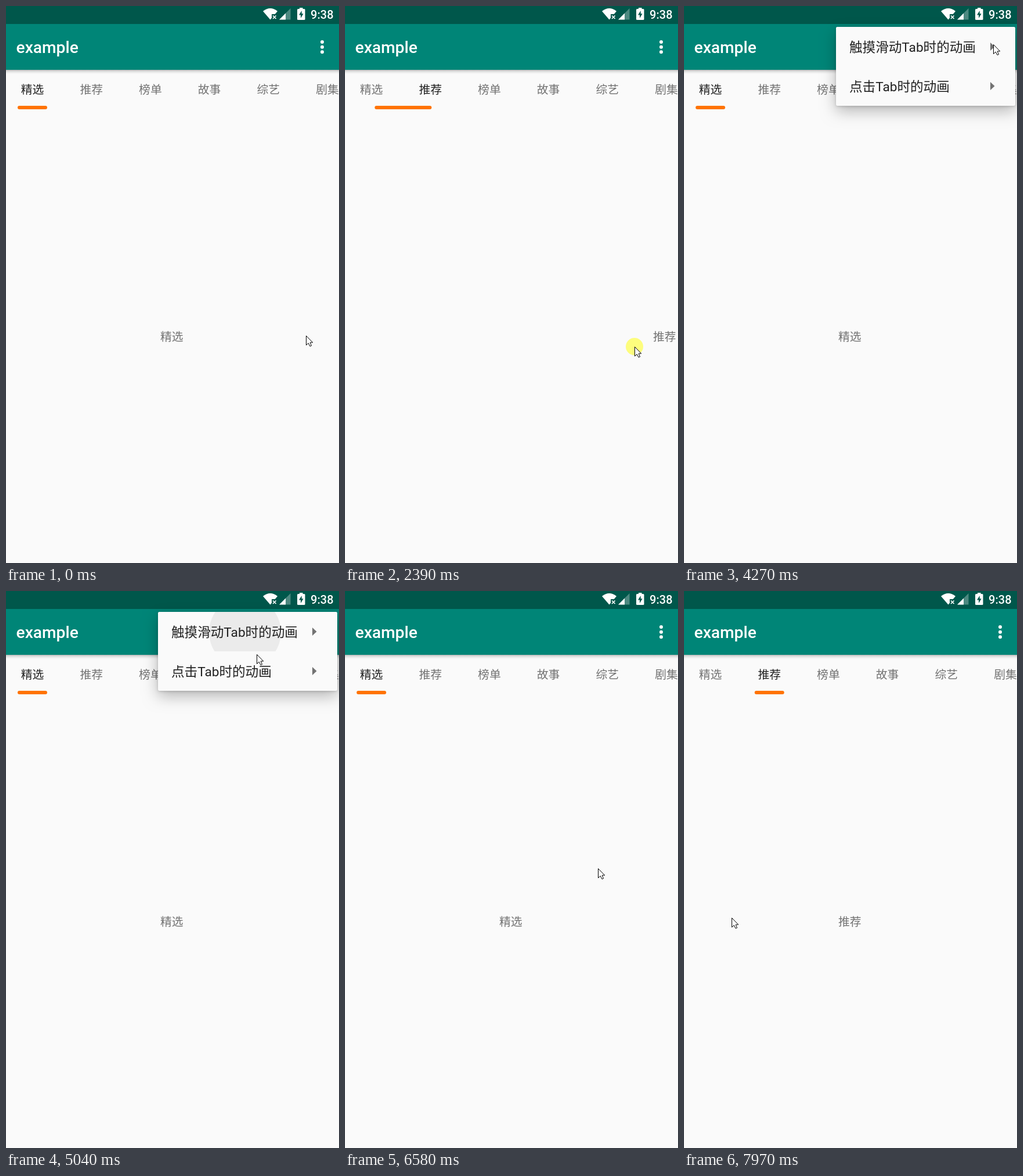
These frames come from a looping animation (574x960 px, 8000 ms). An HTML page with a canvas:

```html
<!DOCTYPE html>
<html lang="zh-CN">
<head>
<meta charset="utf-8">
<title>example</title>
<style>
html, body { margin: 0; width: 100%; height: 100%; overflow: hidden; background: #fafafa; }
canvas { display: block; }
</style>
</head>
<body>
<canvas id="stage" width="574" height="960"></canvas>
<script>
const W = 574, H = 960, LOOP = 8000, TICK = 77.5, LEAD = 23;
const ctx = document.getElementById('stage').getContext('2d');
const FONT = 'Roboto, "Noto Sans CJK SC", "Noto Sans CJK", sans-serif';
const BG = '#fafafa', DARK = '#212121', GREY = '#737373', STATUS = '#00574b';
const TABS = ['精选', '推荐', '榜单', '故事', '综艺', '剧集'];
const TAB_X = 45.5, PITCH = 101.7, BAR_W = 51, SLOP = 12;

// Long moves ease in and out, short ones are linear.
const CURSOR = [
  [1, 517, 568], [3, 520, 568], [5, 520, 568], [14, 165, 593], [18, 165, 595],
  [25, 222, 588], [27, 222, 588], [31, 499, 587], [32, 543, 589], [34, 555, 591],
  [38, 551, 592], [46, 541, 96], [48, 540, 66], [54, 540, 66], [61, 410, 72],
  [64, 410, 72], [65, 432, 109], [76, 432, 210], [80, 432, 210], [83, 435, 455],
  [89, 440, 545], [92, 415, 545], [94, 339, 545], [98, 104, 560], [99, 82, 563]
];

const swipe = (down, from, glue) => ({ down, up: down + 9, from, to: 1 - from, glue });
const SWIPES = [swipe(5, 0, 1), swipe(27, 1, 1), swipe(90, 0, 0.5)];

const clamp = (v, a = 0, b = 1) => Math.min(b, Math.max(a, v));
const span = (k, a, b) => clamp((k - a) / (b - a));
const easeOut = u => 1 - (1 - u) ** 2;
const smooth = u => u * u * (3 - 2 * u);
const within = (k, a, b) => k >= a && k <= b;

function cursorAt(k) {
  const i = CURSOR.findIndex(c => c[0] > k);
  const [t0, x0, y0] = CURSOR[i < 0 ? CURSOR.length - 1 : Math.max(0, i - 1)];
  if (i <= 0) return [x0, y0];
  const [t1, x1, y1] = CURSOR[i];
  const u = (k - t0) / (t1 - t0), e = t1 - t0 > 4 ? smooth(u) : u;
  return [x0 + (x1 - x0) * e, y0 + (y1 - y0) * e];
}

function pagerAt(k) {
  let state = { pos: 0, page: 0, glue: 1 };
  for (const s of SWIPES) {
    if (k < s.down) break;
    const dx = cursorAt(s.down)[0] - cursorAt(Math.min(k, s.up))[0];
    const moved = Math.sign(dx) * Math.max(0, Math.abs(dx) - SLOP) / W;
    const drag = clamp(s.from + moved);
    const f = smooth(span(k, s.up, s.up + 3.7));
    state = { pos: drag + (s.to - drag) * f, page: k > s.up ? s.to : s.from, glue: s.glue };
  }
  return state;
}

function text(str, x, y, size, color, weight = 400, align = 'left') {
  ctx.font = `${weight} ${size}px ${FONT}`;
  ctx.fillStyle = color;
  ctx.textAlign = align;
  ctx.fillText(str, x, y);
  return x + ctx.measureText(str).width;
}

function rect(x, y, w, h, color) {
  ctx.fillStyle = color;
  ctx.fillRect(x, y, w, h);
}

function poly(points, color) {
  ctx.beginPath();
  points.forEach(([x, y]) => ctx.lineTo(x, y));
  ctx.closePath();
  ctx.fillStyle = color;
  ctx.fill();
}

// Right triangle: corner at (x, y), legs along w and h.
function wedge(x, y, w, h, color) {
  ctx.beginPath();
  ctx.moveTo(x, y);
  ctx.lineTo(x + w, y);
  ctx.lineTo(x, y + h);
  ctx.fillStyle = color;
  ctx.fill();
}

function disc(x, y, r, color) {
  ctx.beginPath();
  ctx.arc(x, y, r, 0, 7);
  ctx.fillStyle = color;
  ctx.fill();
}

function round(x, y, w, h, r, color) {
  ctx.beginPath();
  ctx.roundRect(x, y, w, h, r);
  ctx.fillStyle = color;
  ctx.fill();
}

function statusBar() {
  rect(0, 0, W, 31, STATUS);
  ctx.beginPath();
  ctx.moveTo(455.5, 23.5);
  ctx.lineTo(443, 9);
  ctx.quadraticCurveTo(455.5, -1, 468, 9);
  ctx.fillStyle = '#fff';
  ctx.fill();
  rect(458, 14, 10, 10, STATUS);
  ctx.strokeStyle = '#fff';
  ctx.lineWidth = 1.7;
  ctx.beginPath();
  ctx.moveTo(460, 16.5);
  ctx.lineTo(465.5, 22);
  ctx.moveTo(465.5, 16.5);
  ctx.lineTo(460, 22);
  ctx.stroke();
  wedge(490.5, 23.5, -19.5, -19.5, 'rgba(255,255,255,.3)');
  wedge(482, 23.5, -11, -11, '#fff');
  rect(506, 3, 5.5, 3, '#fff');
  round(502, 5, 13.5, 19, 1.5, '#fff');
  wedge(509.7, 15.6, -4.7, -7.6, STATUS);
  wedge(508, 13.3, 4.6, 7.7, STATUS);
  text('9:38', 564.5, 22, 20, '#fff', 500, 'right');
}

function toolbar() {
  const g = ctx.createLinearGradient(0, 110, 0, 117);
  g.addColorStop(0, 'rgba(0,0,0,.26)');
  g.addColorStop(0.4, 'rgba(0,0,0,.1)');
  g.addColorStop(1, 'rgba(0,0,0,0)');
  rect(0, 110, W, 7, g);
  rect(0, 31, W, 79, '#008577');
  text('example', 17.5, 81, 28.2, '#fff', 500);
  for (let i = -1; i < 2; i++) disc(545, 70.7 + 8.6 * i, 3, '#fff');
}

function pager({ pos, page, glue }) {
  TABS.forEach((name, i) =>
    text(name, TAB_X + PITCH * i, 151.3, 19.8, i === page ? DARK : GREY, 400, 'center'));
  const w = BAR_W * (1 + glue * 2 * Math.min(pos, 1 - pos));
  round(TAB_X + PITCH * pos - w / 2, 172, w, 6, 3, '#ff7300');
  for (let i = 0; i < 2; i++)
    text(TABS[i], 285.7 + (i - pos) * W, 577.3, 19.8, GREY, 400, 'center');
}

// Popup that unfolds from its top right corner.
function popup(x, w, h, open, alpha, content) {
  if (open <= 0 || alpha <= 0) return;
  const y = 36, vw = w * open, vh = h * open, vx = x + w - vw;
  ctx.save();
  ctx.globalAlpha = alpha * clamp(open * 1.6);
  ctx.shadowColor = 'rgba(0,0,0,.28)';
  ctx.shadowBlur = 26;
  ctx.shadowOffsetY = 9;
  round(vx, y, vw, vh, 3, BG);
  ctx.shadowColor = 'rgba(0,0,0,.18)';
  ctx.shadowBlur = 4;
  ctx.shadowOffsetY = 1;
  round(vx, y, vw, vh, 3, BG);
  ctx.shadowColor = 'transparent';
  ctx.clip();
  content();
  ctx.restore();
}

function ripple(x, y, r, strength, left, top, w) {
  if (strength <= 0) return;
  ctx.save();
  ctx.beginPath();
  ctx.rect(left, top, w, 68);
  ctx.clip();
  disc(x, y, r, `rgba(0,0,0,${0.06 * strength})`);
  ctx.restore();
}

function mainMenu(k) {
  if (!within(k, 51, 68)) return;
  const fade = 1 - span(k, 65, 68);
  popup(262, 309, 136, easeOut(span(k, 50, 54)), fade, () => {
    if (k >= 64) ripple(412, 71, 20 + 42 * (k - 64), fade, 262, 36, 309);
    ['触摸滑动Tab时的动画', '点击Tab时的动画'].forEach((label, i) => {
      const y = 70 + 68 * i;
      text(label, 285, y + 8.5, 22.6, DARK);
      poly([[528, y - 7], [535.5, y], [528, y + 7]], GREY);
    });
  });
}

function subMenu(k) {
  if (!within(k, 67, 83)) return;
  popup(299, 309, 271, easeOut(span(k, 66, 70)), 1 - span(k, 81, 84), () => {
    if (k >= 80) ripple(432, 208, 20 + 50 * (k - 80), 1, 299, 172, 309);
    let x = text('触摸滑动', 321.5, 77.3, 19.8, GREY);
    x = text('Tab', x, 77.3, 19.8, GREY, 500);
    text('时的动画', x, 77.3, 19.8, GREY);
    ['GLUE', 'HALF_GLUE', 'NONE'].forEach((label, i) => {
      const y = 138 + 67.8 * i, color = i ? GREY : '#d81b60';
      text(label, 321.5, y + 8.5, 22.6, DARK);
      ctx.beginPath();
      ctx.arc(531, y, 12.8, 0, 7);
      ctx.strokeStyle = color;
      ctx.lineWidth = 2.8;
      ctx.stroke();
      if (!i) disc(531, y, 7.2, color);
    });
  });
}

function pointer(k) {
  const [x, y] = cursorAt(k).map(Math.round);
  const tapped = within(k, 49, 50) || k === 63 || within(k, 77, 79);
  if (tapped || SWIPES.some(s => within(k, s.down, s.up))) disc(x, y, 15, 'rgba(255,255,0,.5)');
  ctx.save();
  ctx.translate(x + 0.5, y + 0.5);
  poly([[0, 0], [0, 16], [3.7, 12.6], [6.5, 18], [9, 17], [6.6, 11.5], [11.2, 11.5]], '#fff');
  ctx.strokeStyle = '#000';
  ctx.lineWidth = 1;
  ctx.stroke();
  ctx.restore();
}

function draw(k) {
  rect(0, 0, W, H, BG);
  pager(pagerAt(k));
  toolbar();
  statusBar();
  mainMenu(k);
  subMenu(k);
  pointer(k);
}

function loop() {
  draw(Math.floor((performance.now() % LOOP + LEAD) / TICK));
  requestAnimationFrame(loop);
}
loop();
</script>
</body>
</html>
```
